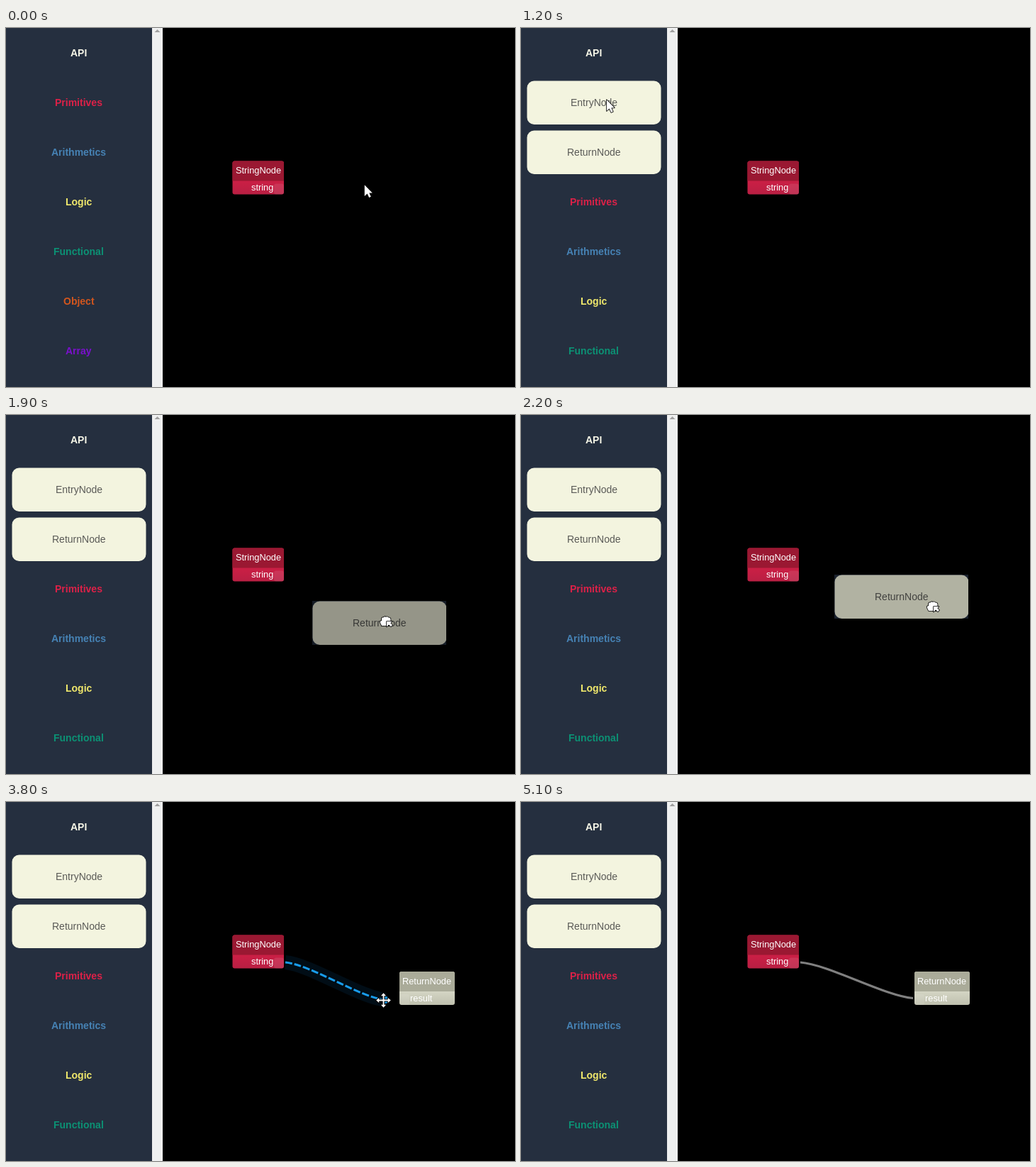
Recreate the animation shown at these times as an HTML page with a canvas. Size 718 px wide and 506 px high, loop 5.4 s.

```html
<!DOCTYPE html>
<html lang="en">
<head>
<meta charset="utf-8">
<title>Node editor</title>
<style>
html, body { margin: 0; width: 100%; height: 100%; overflow: hidden; background: #000; }
canvas { display: block; }
</style>
</head>
<body>
<canvas id="stage" width="718" height="506"></canvas>
<script>
const stage = document.getElementById('stage');
const ctx = stage.getContext('2d');
const FONT = '"Liberation Sans", Arial, sans-serif';
const NAVY = '#252f3f', CREAM = '#f3f4df';
const LOOP = 5400, STEP = 100;

// Moments of the story, in steps
const OPEN = 9, GRAB = 15, DROP = 24, PULL = 34, CONNECT = 42, LEAVE = 49, HIDE = 51;

const groups = [
  ['API', '#f5f5e6'], ['Primitives', '#dc2148'], ['Arithmetics', '#4682b4'],
  ['Logic', '#f0e86c'], ['Functional', '#0c9174'], ['Object', '#d2561e'], ['Array', '#7a10cc']
];

// A path is a starting point and straight glides: [from step, to step, x, y]
const pointer = {
  start: [505, 220],
  glides: [
    [2, 6, 90, 40], [7, 8, 100, 27], [OPEN, 12, 120, 100], [12, GRAB, 122, 166],
    [GRAB, 19, 527, 283], [19, 22, 572, 262], [22, DROP, 555, 239], [DROP, 25, 534.5, 236.5],
    [25, 29, 408.5, 226.5], [29, 32, 376.5, 224.5], [33, 38, 532.5, 279.5],
    [38, 40, 567.5, 280.5], [43, 46, 402.5, 190.5], [47, LEAVE, 122, 4]
  ]
};
const dragged = {
  start: [27, 146],
  glides: [[GRAB, 19, 432, 262], [19, 22, 442, 225], [22, 23, 464, 212]]
};

function along({ start, glides }, s) {
  let [x, y] = start;
  for (const [a, b, toX, toY] of glides) {
    const p = Math.min(1, Math.max(0, (s - a) / (b - a)));
    x += (toX - x) * p;
    y += (toY - y) * p;
  }
  return [x, y].map(v => Math.round(v * 2) / 2);
}

function rect(x, y, w, h, color, radius = 0) {
  ctx.fillStyle = color;
  ctx.beginPath();
  ctx.roundRect(x, y, w, h, radius);
  ctx.fill();
}

// Glyph runs start on whole pixels
function text(str, x, y, color, font, centred = true) {
  ctx.fillStyle = color;
  ctx.font = font + ' ' + FONT;
  const shift = centred ? ctx.measureText(str).width / 2 : 0;
  ctx.fillText(str, Math.round(x - shift), y);
}

function item(label, x, y) {
  rect(x, y, 189, 61.5, CREAM, 10);
  text(label, x + 94.2, Math.round(y + 35), '#5a5a57', '14px');
}

function sidebar(open) {
  rect(0, 0, 206, 506, NAVY);
  rect(206, 0, 15, 506, '#eff0f0');
  ctx.fillStyle = '#a0a0a0';
  ctx.fill(new Path2D('M209.5 6 L213.5 2 L217.5 6Z'));
  groups.forEach(([name, color], i) =>
    text(name, 102.7, 40 + 70 * (i + (open && i ? 2 : 0)), color, 'bold 14px'));
  if (open) {
    item('EntryNode', 8.5, 74.5);
    item('ReturnNode', 8.5, 144.5);
  }
}

function node(x, y, w, title, port, portX, socketX, [head, top, bottom]) {
  const row = ctx.createLinearGradient(0, y + 28, 0, y + 47);
  row.addColorStop(0, top);
  row.addColorStop(1, bottom);
  rect(x, y, w, 47, row, 3);
  rect(x, y, w, 28, head, [3, 3, 0, 0]);
  rect(socketX, y + 32, 14, 15, 'rgba(255,255,255,.1)', 3);
  text(title, x + w / 2, Math.round(y + 17.8), '#fff', '12.8px');
  text(port, portX, Math.round(y + 41.8), '#fff', '12.8px', false);
}

function wire(x, y, color, live) {
  const x0 = 394, y0 = 226;
  const dx = (x - x0) * 0.25, dy = (y - y0) * 0.06;
  const curve = new Path2D(`M${x0} ${y0} C${x0 + dx} ${y0 + dy} ${x - dx} ${y - dy} ${x} ${y}`);
  const stroke = (width, style) => {
    ctx.lineWidth = width;
    ctx.strokeStyle = style;
    ctx.stroke(curve);
  };
  if (live) {
    stroke(20, '#010d16');
    ctx.setLineDash([10, 3]);
  }
  stroke(3, color);
  ctx.setLineDash([]);
  if (live) rect(x - 5, y - 5, 10, 10, color, 5);
}

function outlined(path, width) {
  ctx.lineJoin = 'round';
  ctx.lineWidth = width;
  ctx.strokeStyle = '#000';
  ctx.stroke(path);
  ctx.fillStyle = '#fff';
  ctx.fill(path);
}

const arrowShape = new Path2D('M.8 1.2 V17 L4.6 13.6 L7.2 19 L9.8 17.8 L7.3 12.4 H11.8Z');
const fistShape = new Path2D('M3 14 L.8 9.5 Q.3 7 3 7 V4 Q3.5 1.8 5.5 2.5 Q7 .2 9 1.8 Q11 .6 12.5 2.6 Q15.5 2.2 15.5 5 V9 L13.5 14Z');
const badgeShape = new Path2D('M10 8 H17.5 L15.3 10.2 L18 13 L16 15.2 L13 12.5 L10 15.5Z');
const crossShape = new Path2D();
for (let i = 0; i < 4; i++) {
  crossShape.addPath(
    new Path2D('M-.9 0 V-6.3 H-3.6 L0 -10.3 L3.6 -6.3 H.9 V0Z'), new DOMMatrix().rotate(90 * i));
}

function cursor(s) {
  if (s >= HIDE) return;
  ctx.save();
  ctx.translate(...along(pointer, s));
  if (s < GRAB || s >= LEAVE) {
    outlined(arrowShape, 1.6);
  } else if (s < DROP) {
    outlined(fistShape, 1.6);
    outlined(badgeShape, 1.6);
  } else {
    outlined(crossShape, 2);
    rect(-0.9, -0.9, 1.8, 1.8, '#fff');
  }
  ctx.restore();
}

// The dragged copy fades as one layer, so it is painted once and kept
const ghost = document.createElement('canvas');
ghost.width = 189;
ghost.height = 62;
rect(0, 0, 189, 62, NAVY);
item('ReturnNode', 0.5, 0.5);
ghost.getContext('2d').drawImage(stage, 0, 0);

function draw(s) {
  rect(0, 0, 718, 506, '#000');
  sidebar(s >= OPEN);

  if (s >= CONNECT) {
    wire(553, 276.5, '#808080', false);
  } else if (s >= PULL) {
    const [x, y] = along(pointer, s);
    wire(x + 3, y - 0.5, '#189cec', true);
  }

  node(319.5, 187.5, 72.5, 'StringNode', 'string', 346, 378, ['#9a1832', '#cb1f45', '#b91f43']);
  if (s >= DROP) {
    node(555, 239, 78, 'ReturnNode', 'result', 569.8, 555, ['#aaab99', '#d4d5c4', '#bfc0ae']);
  }

  if (s > GRAB && s < DROP) {
    ctx.globalAlpha = 0.61 + 0.04 * (s - 19);
    ctx.drawImage(ghost, ...along(dragged, s).map(Math.round));
    ctx.globalAlpha = 1;
  }
  cursor(s);
}

const begin = performance.now();
function tick() {
  draw(Math.floor(((performance.now() - begin) % LOOP) / STEP));
  requestAnimationFrame(tick);
}
tick();
</script>
</body>
</html>
```
